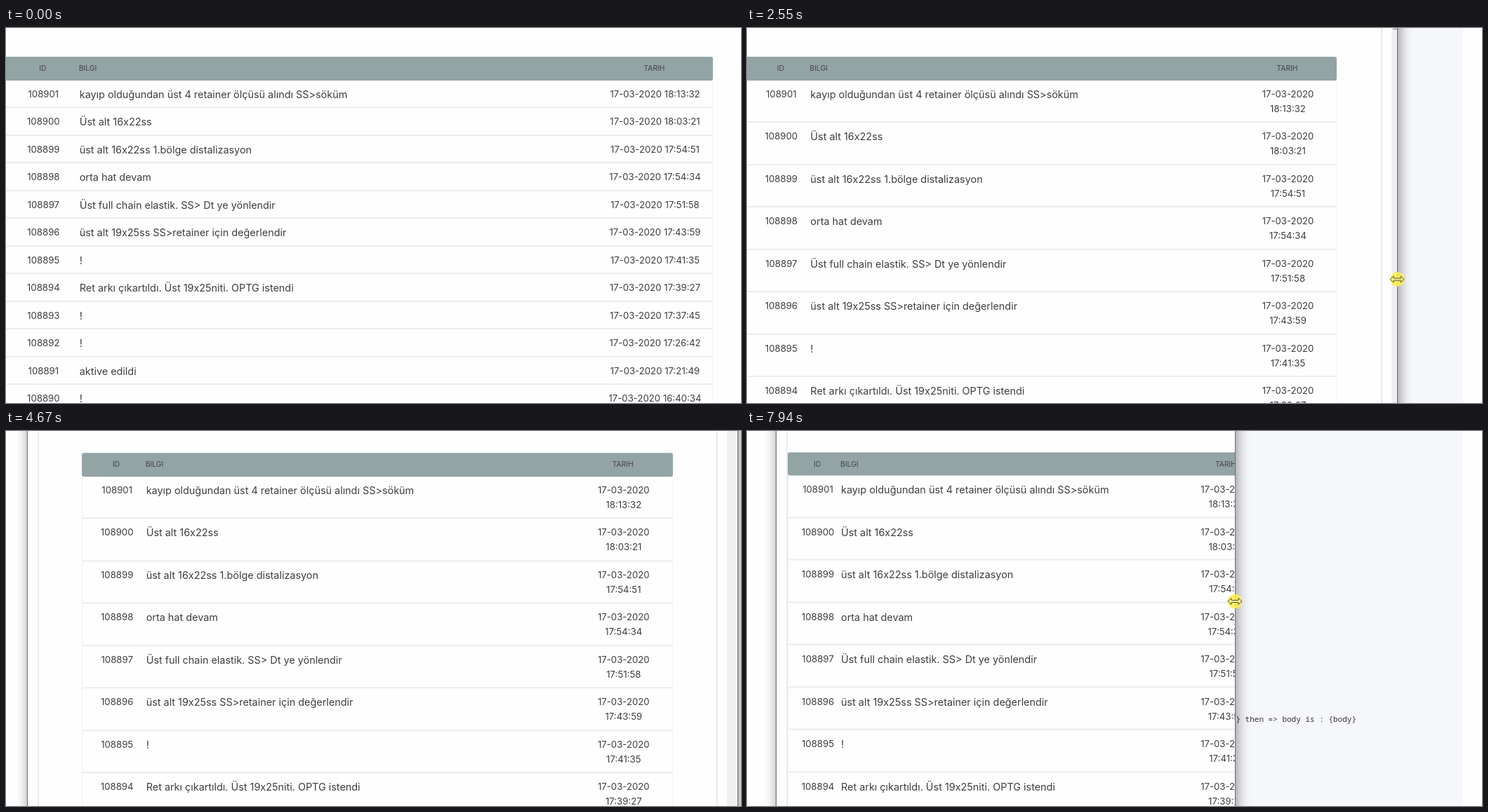
Animation of 1047x535 px, one loop 8000 ms. Source, as an HTML page:

```html
<!DOCTYPE html>
<html lang="tr">
<head>
<meta charset="utf-8">
<title>Responsive table</title>
<style>
html, body { margin: 0; width: 100%; height: 100%; overflow: hidden; background: #fefefe; }
body { position: relative; font: 14.4px/21px Inter, sans-serif; color: #3d3d3f; }
body div, .cursor { position: absolute; white-space: nowrap; }
.editor { left: 400px; width: 620px; top: 0; bottom: 0; background: #f6f7fa; }
.code { right: 179px; top: 400px; font: 11px/21px "Noto Sans Mono", monospace; color: #333; }
.window { top: -30px; bottom: -30px; background: #fefefe; box-shadow: 2px 0 18px rgba(0,0,0,.48); }
.clip { inset: 0; overflow: hidden; }
.frame { inset: 0 -1px; border: solid #6c6c6e; border-width: 0 1px; }
.page { left: 0; top: 30px; height: 600px; min-width: 740px; }
.card { left: 14px; right: 28px; top: -30px; bottom: 0; border: solid #e9eaec; border-width: 0 2px; }
.scrollbar { right: 0; width: 15px; top: -30px; bottom: 0; background: #f0f0f1; }
.thumb { left: 2px; width: 11px; top: 0; height: 33px; background: #c1c1c1; }
.head { left: 0; right: 0; top: 0; height: 33.5px; border-radius: 3px; background: #93a4a4;
  font-size: 10.3px; line-height: 33.5px; color: #45404f; }
.row { left: 0; right: 0; box-sizing: border-box; border: solid #f2f2f3; border-width: 0 1px 2px;
  border-bottom-color: #ededee; }
.row > div { top: 9px; }
.id, .date { transform: translateX(-50%); text-align: center; }
.row .id, .row .date { font-size: 13.2px; }
.id { left: var(--id); }
.info { left: var(--info); }
.date { left: var(--date); }
.narrow .row .date { width: 90px; white-space: normal; }
.cursor { left: 0; top: 0; overflow: visible; }
</style>
</head>
<body>
<div class="editor"></div>
<div class="code">request : {res} then =&gt; body is : {body}</div>
<div class="window">
  <div class="clip">
    <div class="page">
      <div class="card"></div>
      <div class="scrollbar"><div class="thumb"></div></div>
      <div class="table">
        <div class="head"><div class="id">ID</div><div class="info">BILGI</div><div class="date">TARIH</div></div>
      </div>
    </div>
  </div>
  <div class="frame"></div>
</div>
<svg class="cursor" width="1" height="1">
  <circle r="10.5" fill="#fbee54" opacity=".85"/>
  <path class="resize" d="M-10 0L-5-4.5V-1.5H5V-4.5L10 0 5 4.5V1.5H-5V4.5Z" fill="#fff79a" stroke="#56501f"/>
  <path class="arrow" d="M0 0V15L3.5 11.8 6 17.5 8.2 16.5 5.8 11H10.5Z" fill="#fff" stroke="#222"/>
</svg>
<script>
const LOOP = 8000, TICK = 78;
const $ = selector => document.querySelector(selector);
const win = $('.window'), page = $('.page'), table = $('.table'), cursor = $('.cursor');
const resize = $('.resize'), arrow = $('.arrow');

const entries = [
  ['kayıp olduğundan üst 4 retainer ölçüsü alındı SS>söküm', '18:13:32'],
  ['Üst alt 16x22ss', '18:03:21'],
  ['üst alt 16x22ss 1.bölge distalizasyon', '17:54:51'],
  ['orta hat devam', '17:54:34'],
  ['Üst full chain elastik. SS> Dt ye yönlendir', '17:51:58'],
  ['üst alt 19x25ss SS>retainer için değerlendir', '17:43:59'],
  ['!', '17:41:35'],
  ['Ret arkı çıkartıldı. Üst 19x25niti. OPTG istendi', '17:39:27'],
  ['!', '17:37:45'],
  ['!', '17:26:42'],
  ['aktive edildi', '17:21:49'],
  ['!', '16:40:34'],
];

function add(parent, className, text = '') {
  const el = document.createElement('div');
  el.className = className;
  el.textContent = text;
  return parent.appendChild(el);
}

const rows = entries.map(([info, time], i) => {
  const row = add(table, 'row');
  add(row, 'id', 108901 - i);
  add(row, 'info', info);
  add(row, 'date', '17-03-2020 ' + time);
  return row;
});

const linear = p => p;
const smooth = p => p * p * (3 - 2 * p);
const easeIn = p => p ** 1.45;
const easeOut = p => 1 - (1 - p) ** 2.6;
const late = p => p ** 6;
const arc = p => Math.sin(Math.PI * p);

// Each move runs from the state before it; without an x the cursor holds the window's right edge.
const initial = { left: -79, top: 0, width: 1174, x: 918, y: 590 };
const moves = [
  { start: 70, end: 220, x: 1100, y: 358, pointer: true },
  { start: 1550, end: 2320, width: 1013, ease: smooth },
  { start: 2410, end: 3190, width: 1014, y: 361, swing: -50 },
  { start: 3260, end: 3890, width: 1011, y: -25, easeY: late, swing: -45 },
  { start: 4500, end: 4820, left: 42, top: -7.5, bob: -3, x: 755, ease: easeOut, pointer: true },
  { start: 4970, end: 5370, x: 1075, y: 240, pointer: true },
  { start: 6450, end: 6450, x: 1056, y: 224 },
  { start: 6690, end: 7480, width: 795, y: 239, lead: -55, ease: easeIn },
  { start: 7560, end: 7940, width: 653, y: 243 },
];

function apply(move, from, step, steps) {
  const { ease = linear, easeY = ease, swing = 0, bob = 0, lead = 0 } = move;
  const to = { ...from, ...move };
  const p = step / steps;
  const mix = (key, curve = ease) => from[key] + (to[key] - from[key]) * curve(p);
  const widthAt = q => from.width + (to.width - from.width) * ease(q) + swing * arc(q) ** 3;
  const left = mix('left'), width = widthAt(p);
  return {
    left, width,
    pageWidth: widthAt((step - 1) / steps), // the page lags one step behind its window
    top: mix('top') + bob * arc(p),
    x: 'x' in move ? mix('x') : left + width + lead * arc(p),
    y: mix('y', easeY),
    pointer: move.pointer,
  };
}

function sceneAt(t) {
  let scene = { ...initial, pageWidth: initial.width };
  for (const move of moves) {
    const elapsed = t + 8 - move.start;
    if (elapsed < 0) break;
    const intervals = Math.round((move.end - move.start) / TICK);
    const tick = (move.end - move.start) / intervals || Infinity;
    const step = Math.min(intervals, Math.floor(elapsed / tick)) + 1;
    scene = apply(move, scene, step, intervals + 1);
  }
  return scene;
}

function tableLayout(pageWidth) {
  if (pageWidth > 873) {
    const wide = pageWidth > 1056, width = wide ? 1012 : 842;
    return { wide, width, x: (pageWidth - 15 - width) / 2, y: 41 };
  }
  const width = Math.max(695, pageWidth - 57);
  return { wide: false, width, x: 16 + (width - 695) * .075, y: 37.5 };
}

function draw(t) {
  const scene = sceneAt(t);
  win.style.left = scene.left + 'px';
  win.style.width = scene.width + 'px';
  page.style.width = scene.pageWidth + 'px';
  page.style.transform = `translateY(${scene.top}px)`;

  const { wide, width, x, y } = tableLayout(scene.pageWidth);
  const rowHeight = wide ? 39.5 : 60.5;
  table.classList.toggle('narrow', !wide);
  table.style.cssText = `left:${x}px;top:${y}px;width:${width}px;
    --id:${42 + (width - 695) * .05}px;
    --info:${75 + (width - 695) * .108}px;
    --date:${width - (wide ? 83 : 71)}px`;
  rows.forEach((row, i) => {
    row.style.top = 33.5 + i * rowHeight + 'px';
    row.style.height = rowHeight + 'px';
  });

  cursor.style.transform = `translate(${scene.x}px, ${scene.y}px)`;
  arrow.style.display = scene.pointer ? '' : 'none';
  resize.style.display = scene.pointer ? 'none' : '';
}

const begin = performance.now();
function tick() {
  draw((performance.now() - begin) % LOOP);
  requestAnimationFrame(tick);
}
tick();
</script>
</body>
</html>
```
